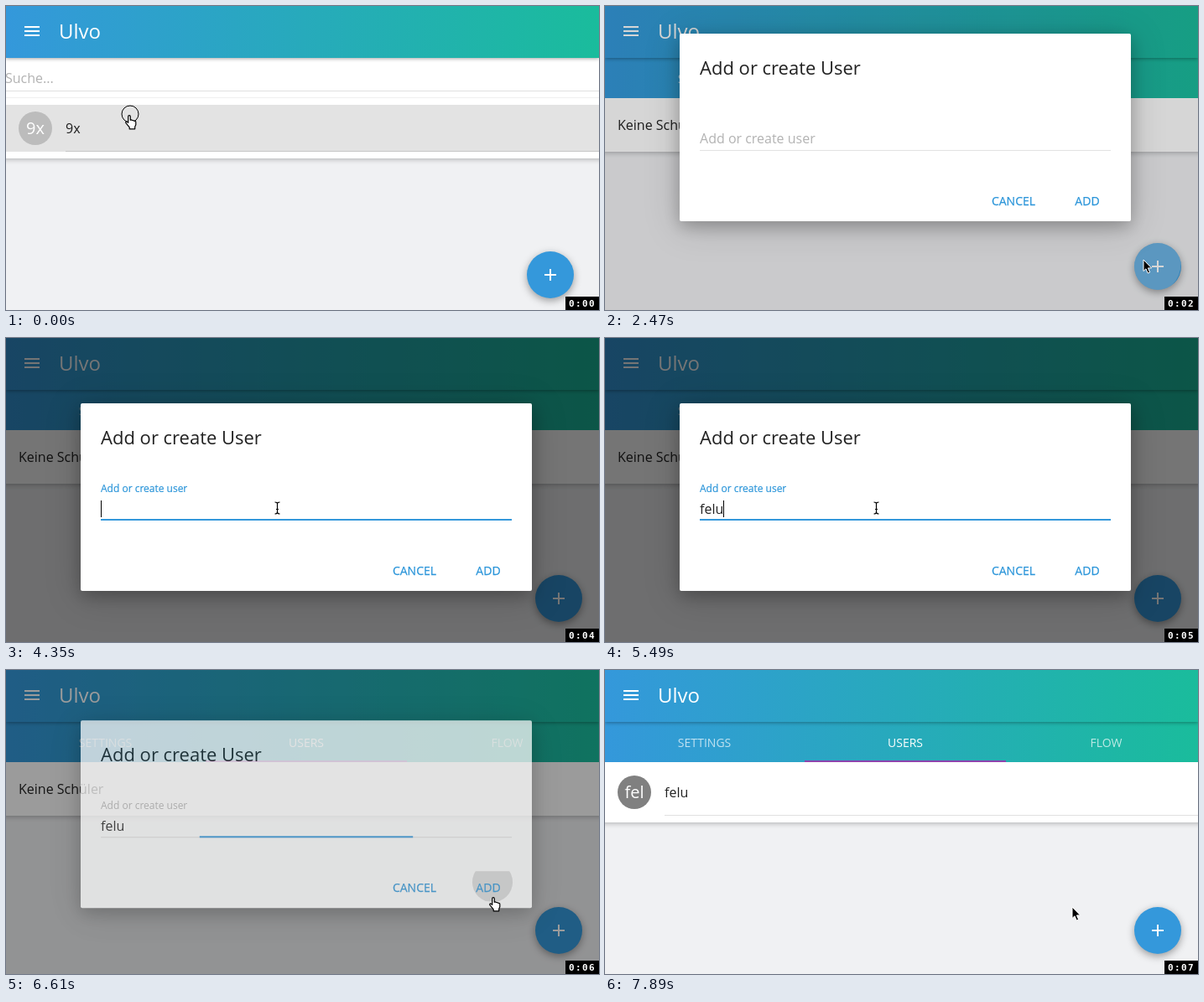
Animation of 707x363 px, one loop 8000 ms. Source, as an HTML page:

```html
<!DOCTYPE html>
<html lang="de">
<head>
<meta charset="utf-8">
<title>Add user</title>
<style>
  html, body { margin: 0; width: 100%; height: 100%; overflow: hidden; background: #f0f1f3; }
  svg { display: block; width: 707px; height: 363px; }
  text { font: 16px "Open Sans", "Noto Sans", sans-serif; fill: rgba(0, 0, 0, .87); white-space: pre; }
  .title { font-size: 24px; fill: #fff; }
  .tab { font-size: 14px; fill: rgba(255, 255, 255, .7); text-anchor: middle; }
  .tab.on { fill: #fff; }
  .initials { font-size: 20px; fill: #fff; text-anchor: middle; }
  .hint { fill: rgba(0, 0, 0, .3); }
  .heading { font-size: 22px; }
  .focused, .button { fill: #2b95d9; stroke: #2b95d9; stroke-width: .25px; }
  .button { font-size: 14px; text-anchor: middle; }
  .clock { font: bold 11px "DejaVu Sans Mono", monospace; letter-spacing: 1.4px; fill: #fff; }
  .paper { fill: #fff; filter: drop-shadow(0 1px 3px rgba(0, 0, 0, .28)); }
  .bar { filter: drop-shadow(0 1px 2px rgba(0, 0, 0, .35)); }
  .disc { fill: #3498db; filter: drop-shadow(0 3px 5px rgba(0, 0, 0, .36)); }
  .sheet { fill: #fff; filter: drop-shadow(0 6px 10px rgba(0, 0, 0, .24)) drop-shadow(0 5px 20px rgba(0, 0, 0, .16)); }
</style>
</head>
<body>
<svg viewBox="0 0 707 363">
  <defs>
    <linearGradient id="sea" gradientUnits="userSpaceOnUse" x1="0" x2="707">
      <stop stop-color="#3498db"/><stop offset="1" stop-color="#1abc9c"/>
    </linearGradient>
    <clipPath id="rowClip"><rect y="118" width="707" height="56"/></clipPath>
    <clipPath id="addClip"><rect x="442" y="180" width="88" height="36" rx="2"/></clipPath>
    <clipPath id="fabClip"><circle r="28"/></clipPath>
  </defs>

  <rect id="ground" width="707" height="363"/>

  <g id="courses">
    <rect class="paper" x="-5" y="62" width="717" height="120"/>
    <text class="hint" x="-1" y="92">Suche...</text>
    <path d="M0 101.5H707" stroke="#e0e0e0"/>
    <path d="M0 109.5H707" stroke="#f0f0f0"/>
    <rect y="118" width="707" height="56" fill="#e3e3e3"/>
    <path d="M71 173.5H707" stroke="#c6c6c6"/>
    <g clip-path="url(#rowClip)"><circle id="rowRipple" cx="148" cy="132" fill="rgba(0,0,0,.08)"/></g>
    <circle cx="35" cy="146" r="20" fill="#bcbcbc"/>
    <text class="initials" x="35" y="153">9x</text>
    <text x="71" y="152">9x</text>
  </g>

  <g id="users">
    <rect id="list" class="paper" x="-5" y="110" width="717"/>
    <text id="empty" x="15" y="148">Keine Schüler</text>
    <g id="entry">
      <circle cx="35" cy="146" r="20" fill="#808080"/>
      <text class="initials" x="35" y="153">fel</text>
      <text x="71" y="152">felu</text>
      <path d="M71 173.5H707" stroke="#e0e0e0"/>
    </g>
    <rect y="62" width="707" height="48" fill="url(#sea)"/>
    <text class="tab" x="118.5" y="92">SETTINGS</text>
    <text class="tab on" x="358" y="92">USERS</text>
    <text class="tab" x="597.5" y="92">FLOW</text>
    <rect x="238" y="108" width="240" height="2" fill="#8e44ad"/>
  </g>

  <g class="bar"><rect width="707" height="62" fill="url(#sea)"/></g>
  <path d="M22 25H40M22 30H40M22 35H40" stroke="#fff" stroke-width="2"/>
  <text class="title" x="63" y="39">Ulvo</text>

  <g id="fab">
    <circle class="disc" r="28"/>
    <g clip-path="url(#fabClip)"><circle id="fabRipple" cx="-10" cy="-4" fill="#fff"/></g>
    <path d="M-7 0H7M0-7V7" stroke="#fff" stroke-width="2"/>
  </g>

  <rect id="shade" width="707" height="363"/>

  <g id="dialog">
    <rect class="sheet" width="538" height="224" rx="2"/>
    <text class="heading" x="24" y="49">Add or create User</text>
    <text id="label">Add or create user</text>
    <text id="input" x="24" y="132"></text>
    <rect id="caret" y="116" width="1" height="20"/>
    <path d="M24 139.5H514" stroke="#e0e0e0"/>
    <rect id="line" y="138" height="2" fill="#3498db"/>
    <g clip-path="url(#addClip)"><circle id="addRipple" cx="491" cy="193" fill="rgba(0,0,0,.14)"/></g>
    <text class="button" x="398" y="205">CANCEL</text>
    <text class="button" x="486" y="205">ADD</text>
  </g>

  <rect x="667" y="347" width="40" height="16"/>
  <text id="clock" class="clock" x="671" y="358.5"></text>

  <g id="pointer">
    <circle id="ring" cx="1" cy="-1" r="10" fill="none" stroke="#000"/>
    <path id="hand" transform="translate(-5.3 .3)" fill="#fff" stroke="#000" stroke-width="1.2" stroke-linejoin="round"
      d="M4 9V1.7a1.3 1.3 0 0 1 2.6 0V6q1.2-.8 2.3.4 1.4-.6 2.2.6 2-.3 2 1.6V11.5L12 14V16.5H5.5V14.5L1.2 9.4q-.6-1.6 1-1.8Z"/>
    <path id="arrow" stroke="#fff" d="M0 0V13.5L3 10.8 5.2 16 7.6 15 5.4 9.9H9.6Z"/>
    <g id="beam" fill="none" transform="translate(.5 0)">
      <path stroke="#fff" stroke-width="2.4" stroke-opacity=".7" d="M0-6V6"/>
      <path stroke="#000" stroke-width="1.2" d="M-3-7Q0-7 0-5V5Q0 7-3 7M3-7Q0-7 0-5M0 5Q0 7 3 7M-1.5 1.5H1.5"/>
    </g>
  </g>
</svg>
<script>
const LOOP = 8000;
const OPEN = 2200, FOCUS = 3450, TYPE = 4650, CLICK = 6200, CLOSE = 6337;
const $ = Object.fromEntries([...document.querySelectorAll('[id]')].map(e => [e.id, e]));

// The screen updates in bursts and rests in between: [first, last, steps].
const bursts = [[150, 900, 6], [1340, 2320, 8], [2470, 3450, 8], [3600, 4350, 6],
  [4650, 5490, 7], [5790, 6760, 7.9], [6910, 7890, 8]];

// Pointer moves: [start, end, x, y].
const moves = [[150, 1340, 156, 142], [1340, 2100, 642, 303], [2610, 3020, 323, 203],
  [5790, 6200, 581, 271], [6700, 7330, 557, 283]];

function hold(time) {
  const burst = bursts.filter(b => b[0] <= time).pop();
  if (!burst) return 0;
  const [first, last, steps] = burst, gap = (last - first) / (steps - 1);
  return Math.min(last, first + gap * Math.floor((time - first + 12) / gap));
}

// Smooth rise from 0 to 1.
function ramp(t, start, length) {
  const p = Math.min(1, Math.max(0, (t - start) / length));
  return p * p * (3 - 2 * p);
}

const set = (el, attrs) => { for (const k in attrs) el.setAttribute(k, attrs[k]); };
const show = (el, on) => { el.style.display = on ? '' : 'none'; };
const within = (t, a, b) => t >= a && t < b;

function drawPages(t) {
  const inside = t >= 450, added = t >= 6700, pale = within(t, 450, 2470);
  show($.courses, !inside);
  show($.users, inside);
  show($.empty, !added);
  show($.entry, added);
  set($.ground, { fill: pale ? '#f4f5f5' : '#f0f1f3' });
  set($.list, { height: added ? 72 : 64 });
  $.list.style.fill = pale ? '#f4f5f5' : '#fff';
  set($.rowRipple, { r: 400 * ramp(t, 0, 450) });
  set($.fab, { transform: inside ? 'translate(659 311)' : 'translate(649 321)' });
  const spread = ramp(t, 2180, 550);
  set($.fabRipple, { r: 70 * spread, opacity: .6 * (1 - spread) });
}

function drawDialog(t) {
  const closing = ramp(t, CLOSE, 450);
  const open = ramp(t, OPEN, 750) - closing;
  const float = ramp(t, FOCUS, 450);
  const focus = float - ramp(t, CLOSE, 320);
  const focused = within(t, FOCUS + 100, CLOSE);

  set($.shade, { opacity: .54 * open });
  show($.dialog, open > 0);
  set($.dialog, {
    transform: `translate(89 ${14 + 64 * open})`,
    opacity: Math.min(ramp(t, OPEN, 260), 1 - closing)
  });
  set($.label, {
    transform: `translate(24 ${131 - 25 * float}) scale(${1 - .25 * float})`,
    class: focused ? 'focused' : 'hint'
  });
  const typed = Math.max(0, Math.floor((t - TYPE) / 190) + 1);
  $.input.textContent = 'felu'.slice(0, typed);
  show($.caret, focused);
  set($.caret, { x: 24 + (typed ? Math.round($.input.getComputedTextLength()) : 0) });
  set($.line, { x: 269 - 245 * focus, width: 490 * focus });
  set($.addRipple, { r: 45 * ramp(t, CLICK, 560) });
}

function drawPointer(t) {
  let x = 147, y = 130;
  for (const [start, end, toX, toY] of moves) {
    const p = ramp(t, start, end - start);
    x += (toX - x) * p;
    y += (toY - y) * p;
  }
  const hand = t < 1480 || within(t, 2030, 2470) || within(t, CLICK - 10, 6600);
  const beam = within(t, 2880, 5900);
  set($.pointer, { transform: `translate(${x} ${y})` });
  show($.hand, hand);
  show($.beam, beam);
  show($.arrow, !hand && !beam);
  show($.ring, t < 150 || within(t, 2310, 2470) || within(t, CLICK - 10, CLOSE - 10));
}

function draw(time) {
  const t = hold(time);
  drawPages(t);
  drawDialog(t);
  drawPointer(t);
  $.clock.textContent = '0:0' + Math.floor(t / 1000);
}

const start = performance.now();
function loop() {
  draw((performance.now() - start) % LOOP);
  requestAnimationFrame(loop);
}
loop();
</script>
</body>
</html>
```
